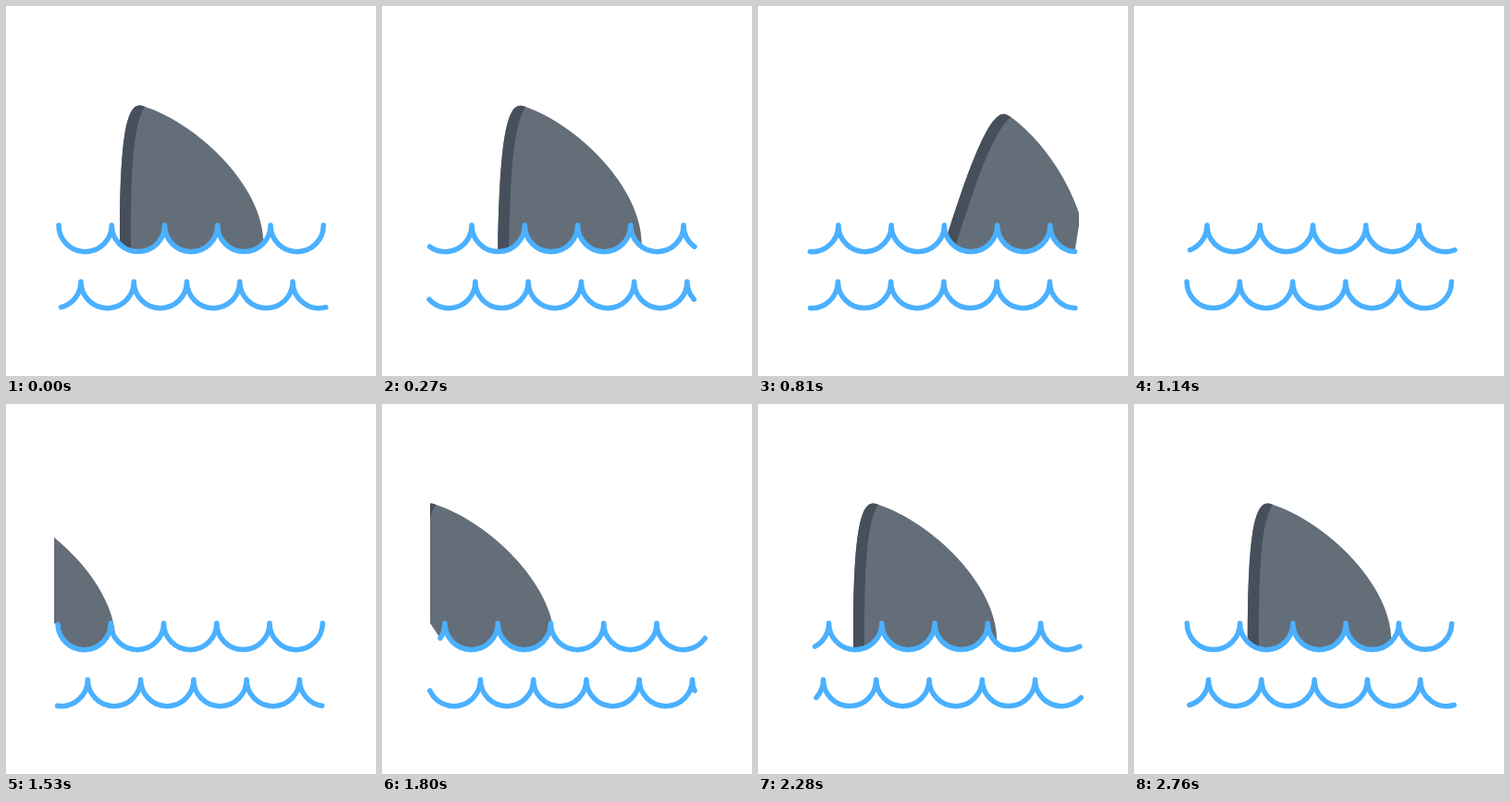
An HTML page that plays this animation: 400 by 400 pixels, repeating every 2790 ms.

```html
<!DOCTYPE html>
<html lang="en">
<head>
<meta charset="utf-8">
<title>Shark fin</title>
<style>
  html, body { margin: 0; width: 100%; height: 100%; overflow: hidden; background: #fff; }
  svg { display: block; width: 100%; height: 100%; }
  .wave { fill: none; stroke: #4ab0ff; stroke-width: 5.5; stroke-linecap: round; stroke-linejoin: round; }
</style>
</head>
<body>
<svg viewBox="0 0 400 400">
  <clipPath id="aboveWater"><path id="waterline"/></clipPath>
  <g clip-path="url(#aboveWater)">
    <g id="fin">
      <path fill="#646e78" d="M123 300V258C123 165 127 107.5 144 107.5Q147 107.5 150 108.7C207 127.5 278 194 278.5 256V300Z"/>
      <path fill="#464f5b" d="M123 300V258C123 165 127 107.5 144 107.5Q147 107.5 150 108.7C136 130 135 190 135 262V300Z"/>
    </g>
  </g>
  <path id="topWave" class="wave"/>
  <path id="lowWave" class="wave"/>
</svg>
<script>
const LOOP = 2790, STEP = 30, FIN_WRAP = 1245;
const LEFT = 57, WIDTH = 57.25, RADIUS = WIDTH / 2, ARCS = 5;
const TOP_Y = 237, LOW_Y = 298, LOW_PHASE = .581;

const $ = id => document.getElementById(id);
const fin = $("fin"), waterline = $("waterline"), topWave = $("topWave"), lowWave = $("lowWave");

// Arcs travelled after a share x of the loop: an even pace plus a soft surge.
const glide = (x, total, surge, ease, ripple = 0) => total * x
  + surge * Math.sin(Math.PI * x)
  - ease * Math.sin(2 * Math.PI * x)
  - ripple * Math.sin(3 * Math.PI * x);

// A row of half circles, trimmed to a constant length while it slides.
function wavePath(travel, y) {
  const phase = travel - Math.floor(travel);
  const point = s => {
    const n = Math.floor(s), angle = Math.PI * (s - n);
    const px = LEFT + (n - phase) * WIDTH + RADIUS * (1 - Math.cos(angle));
    return px.toFixed(2) + " " + (y + RADIUS * Math.sin(angle)).toFixed(2);
  };
  let d = point(phase);
  const arcTo = s => { d += `A${RADIUS} ${RADIUS} 0 0 0 ${point(s)}`; };
  for (let n = 1; n <= ARCS; n++) arcTo(n);
  if (phase > 0) arcTo(phase + ARCS);
  return d;
}

// The fin speeds off to the right while tipping over, then glides in upright from the left.
function finTransform(t) {
  if (t >= FIN_WRAP) return `translate(${-160 * ((LOOP - t) / 1260) ** 2.3} 0)`;
  const u = t / 510;
  return `translate(${18 * u ** 3.2} 0) rotate(${5.5 * u ** 2.5} 135 258)`;
}

function draw(t) {
  const x = t / LOOP;
  const top = wavePath(glide(x, 6.01, .468, .626, .08), TOP_Y);
  const low = wavePath(LOW_PHASE - glide(x, 3, .448, .135), LOW_Y);
  topWave.setAttribute("d", "M" + top);
  lowWave.setAttribute("d", "M" + low);
  waterline.setAttribute("d", `M52 60V${TOP_Y}L${top}L347 ${TOP_Y}V60Z`);
  fin.setAttribute("transform", finTransform(t));
}

const start = performance.now();
function tick() {
  const t = (performance.now() - start) % LOOP;
  draw(Math.floor(t / STEP) * STEP);
  requestAnimationFrame(tick);
}
tick();
</script>
</body>
</html>
```
